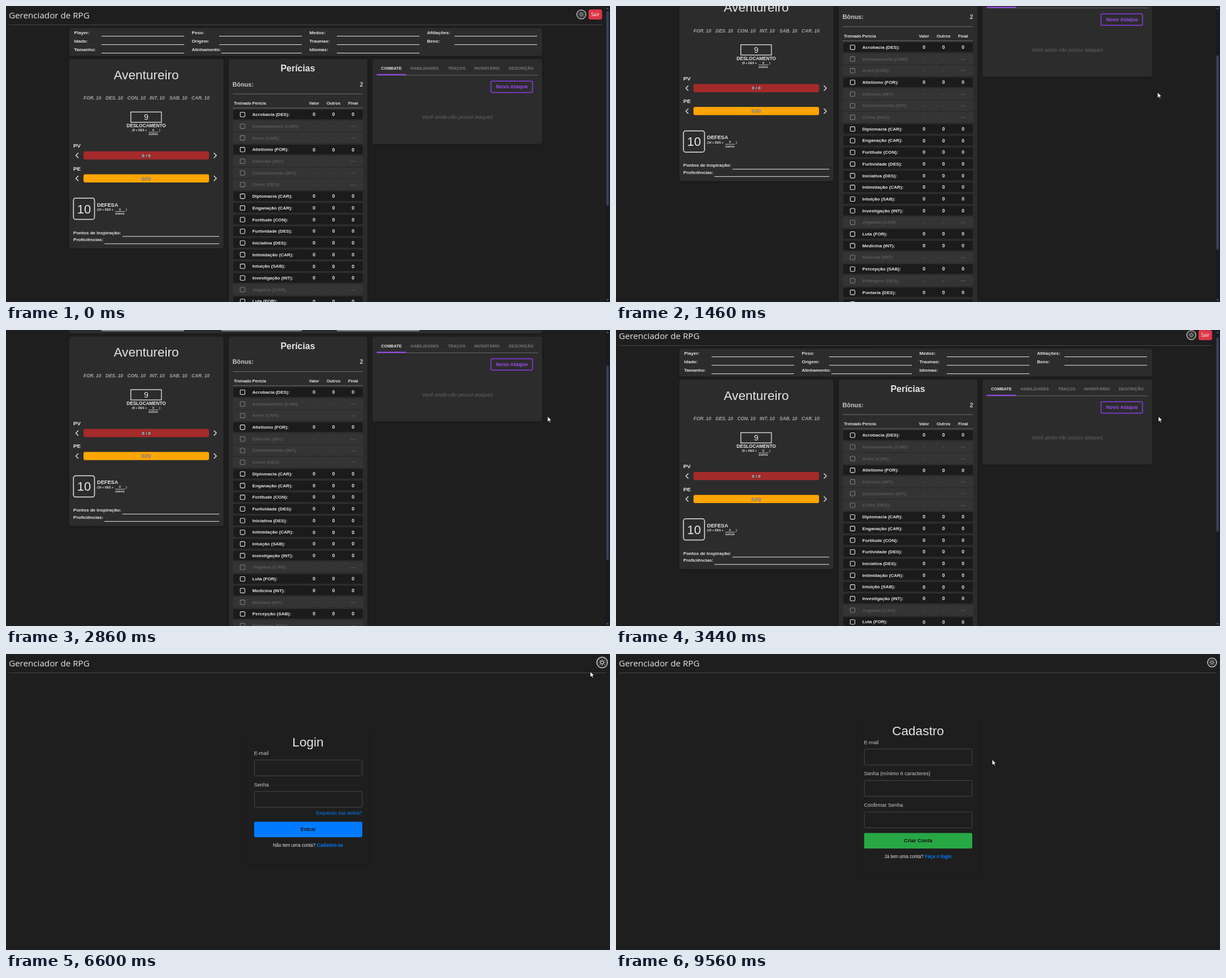
Write an HTML page that moves like this. It is 1068 px wide and 525 px high and loops after 9580 ms.

```html
<!DOCTYPE html>
<html lang="pt">
<head>
<meta charset="utf-8">
<title>Gerenciador de RPG</title>
<style>
/* --k: share of the light theme, --s: scroll offset */
@property --k { syntax: '<percentage>'; inherits: true; initial-value: 0%; }
@property --s { syntax: '<number>'; inherits: true; initial-value: 0; }

html, body { margin: 0; width: 100%; height: 100%; overflow: hidden; background: #1e1e1e; }
body { animation: theme 9.58s linear infinite, scroll 9.58s linear infinite; }

#stage {
  --bg: color-mix(in srgb, #fdfdfd var(--k), #1e1e1e);
  --panel: color-mix(in srgb, #f9f9f9 var(--k), #2c2c2c);
  --text: color-mix(in srgb, #2b2b2b var(--k), #e6e6e6);
  --soft: color-mix(in srgb, #4a4a4a var(--k), #c8c8c8);
  --attr: color-mix(in srgb, #666 var(--k), #a4a4a4);
  --tab: color-mix(in srgb, #858585 var(--k), #777);
  --dim: color-mix(in srgb, #999 var(--k), #636363);
  --off: color-mix(in srgb, #a8a8a8 var(--k), #5a5a5a);
  --box: color-mix(in srgb, #777 var(--k), #808080);
  --rule: color-mix(in srgb, #ccc var(--k), #474747);
  --row: color-mix(in srgb, #fff var(--k), #1b1b1b);
  --rowOff: color-mix(in srgb, #f0f0f0 var(--k), #343434);
  display: block; width: 1068px; height: 525px; background: var(--bg);
  font-family: "Liberation Sans", Arial, sans-serif;
}
text { fill: var(--text); white-space: pre; }
.b { font-weight: bold; }
.i { font-style: italic; }
.ui { font-family: "Open Sans", "Noto Sans", sans-serif; }
.soft { fill: var(--soft); }
.attr { fill: var(--attr); }
.tab { fill: var(--tab); }
.dim { fill: var(--dim); }
.off { fill: var(--off); }
.blue { fill: #007bff; }
.ink { fill: #141414; }
.purple { fill: #9a48f0; }
.white { fill: #fff; }
.onbar { fill: #e8e8e8; stroke: #222; stroke-width: 1; paint-order: stroke; }
.panel { fill: var(--panel); filter: drop-shadow(0 1px 1.5px rgba(0,0,0,.25)); }
.card { fill: var(--bg); filter: drop-shadow(0 1px 2px rgba(0,0,0,.16)); }
.ln { fill: none; stroke: var(--text); }
.rule { fill: none; stroke: var(--rule); }
.row { fill: var(--row); }
.rowOff { fill: var(--rowOff); }
.boxOff { fill: none; stroke: var(--box); }
.solid { fill: var(--text); }

#sheet, #login, #signup, #hand, #arrow, .sun, .moon, .exit, #enter, #link {
  animation: 9.58s step-end infinite;
}
#sheet { animation-name: sheet; }
#login { animation-name: login; }
#signup { animation-name: signup; }
#page { transform: translateY(calc(var(--s) * -1px)); }
#thumb { transform: translateY(calc(var(--s) * .657px)); }
.sun { animation-name: sun; }
.moon { animation-name: moon; }
.exit { animation-name: exit; }
#enter { animation-name: enter; }
#link { animation-name: link; }
#sheet .icon { animation: sheetIcon 9.58s linear infinite; }
#login .icon { animation: loginIcon 9.58s linear infinite; }
#cursor { animation: move 9.58s ease-in-out infinite; }
#arrow { animation-name: arrow; }
#hand { animation-name: hand; }

@keyframes theme {
  0%, 41.54% { --k: 0%; }
  44.15%, 65.24% { --k: 100%; }
  68.37%, 100% { --k: 0%; }
}
@keyframes scroll {
  0% { --s: 0; }
  9.81% { --s: 0; animation-timing-function: cubic-bezier(.4,.2,.8,.8); }
  15.24% { --s: 119; animation-timing-function: cubic-bezier(.2,.2,.6,1); }
  19.62%, 25.89% { --s: 248; }
  27.14% { --s: 207; animation-timing-function: cubic-bezier(.3,.35,.7,1); }
  32.15%, 34.66% { --s: 24; }
  35.91% { --s: 6; }
  36.74%, 100% { --s: 0; }
}
@keyframes sheet { 0% { opacity: 1; } 60.54%, 100% { opacity: 0; } }
@keyframes login { 0% { opacity: 0; } 60.54% { opacity: 1; } 97.29%, 100% { opacity: 0; } }
@keyframes signup { 0% { opacity: 0; } 97.29%, 100% { opacity: 1; } }
@keyframes sun { 0% { opacity: 1; } 41.54% { opacity: 0; } 65.24%, 100% { opacity: 1; } }
@keyframes moon { 0% { opacity: 0; } 41.54% { opacity: 1; } 65.24%, 100% { opacity: 0; } }
@keyframes exit { 0% { fill: #dc3545; } 56.37%, 100% { fill: #bb2d3b; } }
@keyframes enter { 0% { fill: #007bff; } 78.91% { fill: #0062cc; } 82.46%, 100% { fill: #007bff; } }
@keyframes link { 0% { text-decoration: none; } 86.64%, 100% { text-decoration: underline; } }
@keyframes sheetIcon {
  0%, 40.4% { transform: scale(1); }
  42%, 55% { transform: scale(1.18); }
  57%, 100% { transform: scale(1); }
}
@keyframes loginIcon {
  0%, 62.7% { transform: scale(1); }
  64.5%, 68.9% { transform: scale(1.18); }
  71%, 100% { transform: scale(1); }
}
@keyframes move {
  0%, 34.66% { transform: translate(957.5px, 153px); }
  35.91% { transform: translate(959px, 153px); }
  40.71%, 54.49% { transform: translate(1014px, 19px); }
  59.08%, 61.59% { transform: translate(1041px, 16px); }
  63.47%, 67.2% { transform: translate(1053px, 14px); }
  68.89% { transform: translate(1033px, 31px); }
  70.15%, 70.98% { transform: translate(1030px, 36px); }
  80.79%, 81.63% { transform: translate(545px, 310px); }
  84.55% { transform: translate(510px, 364px); }
  88.31%, 97.29% { transform: translate(574px, 338px); }
  99.6%, 100% { transform: translate(665px, 187px); }
}
@keyframes arrow {
  0% { opacity: 0; } .84% { opacity: 1; } 40.4% { opacity: 0; } 60.54% { opacity: 1; }
  62.9% { opacity: 0; } 68% { opacity: 1; } 78.91% { opacity: 0; } 82.46% { opacity: 1; }
  86.64% { opacity: 0; } 97.29%, 100% { opacity: 1; }
}
@keyframes hand {
  0% { opacity: 0; } 40.4% { opacity: 1; } 60.54% { opacity: 0; } 62.9% { opacity: 1; }
  68% { opacity: 0; } 78.91% { opacity: 1; } 82.46% { opacity: 0; } 86.64% { opacity: 1; }
  97.29%, 100% { opacity: 0; }
}
</style>
</head>
<body>
<svg id="stage" viewBox="0 0 1068 525"></svg>
<script>
const text = (x, y, size, str, cls = '', anchor = 'start') =>
  `<text x="${x}" y="${y}" font-size="${size}" class="${cls}" text-anchor="${anchor}">${str}</text>`;
const mid = (x, y, size, str, cls) => text(x, y, size, str, cls, 'middle');
const rect = (x, y, x2, y2, r, attrs) =>
  `<rect x="${x}" y="${y}" width="${x2 - x}" height="${y2 - y}" rx="${r}" ${attrs}/>`;
const hline = (x, x2, y, cls = 'ln', w = 1) =>
  `<path d="M${x} ${y}H${x2}" class="${cls}" stroke-width="${w}"/>`;
const panel = (x, y, x2, y2, cls = 'panel') => rect(x, y, x2, y2, 4, `class="${cls}"`);

function icon(x) {
  let rays = '';
  for (let a = 0; a < 360; a += 45) rays += `<path d="M0-3.6V-5.2" transform="rotate(${a})"/>`;
  return `<g transform="translate(${x} 15)"><g class="icon">
    <circle r="7.9" class="ln" stroke-width="1.3"/>
    <g class="sun"><g class="ln" stroke-width="1"><circle r="2.3"/>${rays}</g></g>
    <g class="moon"><path class="solid" d="M-1-5A5 5 0 1 0 5 1.6A4.3 4.3 0 0 1-1-5Z"/></g>
  </g></g>`;
}

const header = (right, iconX) =>
  text(5, 21.6, 15.2, 'Gerenciador de RPG', 'ui" font-weight="500') +
  hline(5, right, 33.5, 'rule') + icon(iconX);

function infoPanel() {
  const columns = [
    ['Player:', 'Idade:', 'Tamanho:'], ['Peso:', 'Origem:', 'Alinhamento:'],
    ['Medos:', 'Traumas:', 'Idiomas:'], ['Afiliações:', 'Bens:'],
  ];
  return panel(112, 39, 948, 88.5) + columns.map((labels, c) => labels.map((label, r) => {
    const x = 120.5 + c * 208, y = 50 + r * 15;
    return text(x, y, 8.1, label, 'b') +
      hline(x + (label === 'Alinhamento:' ? 52.5 : 48.5), x + 194.5, y + 3.5);
  }).join('')).join('');
}

// Small formula with an editable bonus
const formula = (x, y, str, bonusX) =>
  text(x, y, 5.3, str, 'b') + mid(bonusX, y - .3, 5.3, '0', 'b') +
  hline(bonusX - 8.5, bonusX + 9, y + 1.5, 'ln', .8) +
  mid(bonusX, y + 7, 5.3, 'outros', 'b') + text(bonusX + 10.5, y, 5.3, ')', 'b');

const bar = (y, label, color) =>
  text(119, y - 14, 9.9, label, 'b') +
  rect(137, y - 7.3, 359, y + 7.2, 3, `fill="${color}"`) +
  mid(248, y + 2.8, 8, '0 / 0', 'b onbar') +
  `<path class="ln" stroke-width="1.4" d="M128 ${y - 4.5}l-4.5 4.5l4.5 4.5M367.5 ${y - 4.5}l4.5 4.5l-4.5 4.5"/>`;

function heroPanel() {
  const attrs = { FOR: 137, DES: 176, CON: 214.5, INT: 254, SAB: 289, CAR: 328 };
  return panel(112, 94, 384.5, 430) +
    mid(248, 129.5, 22.6, 'Aventureiro') +
    Object.entries(attrs).map(([n, x]) => text(x, 166, 8.3, n + '. 10', 'b i attr')).join('') +
    rect(220.7, 188, 274.8, 206.3, 0, 'class="ln" stroke-width="1.3"') +
    mid(248, 202.2, 14, '9') +
    mid(248, 215.2, 8.2, 'DESLOCAMENTO', 'b') +
    formula(223, 222.4, '(9 + DES +', 260.5) +
    bar(265, 'PV', '#a52a2a') + bar(305.7, 'PE', '#ffa500') +
    rect(119.3, 340.7, 156.5, 378.5, 4, 'class="ln" stroke-width="1.5"') +
    mid(138, 367.5, 22, '10') +
    text(161, 355.5, 9.2, 'DEFESA', 'b') +
    formula(161, 363, '(10 + DES +', 201.5) +
    text(119, 404.5, 8.1, 'Pontos de Inspiração:', 'b') + hline(206, 377, 408.7) +
    text(119, 417, 8.1, 'Proficiências:', 'b') + hline(174, 377, 421.7);
}

// A leading "-" marks a skill that needs training
const skills = `Acrobacia DES,-Adestramento CAR,-Artes CAR,Atletismo FOR,-Ciências INT,
-Conhecimento INT,-Crime DES,Diplomacia CAR,Enganação CAR,Fortitude CON,Furtividade DES,
Iniciativa DES,Intimidação CAR,Intuição SAB,Investigação INT,-Jogatina CAR,Luta FOR,
Medicina INT,-Nobreza INT,Percepção SAB,-Pilotagem DES,Pontaria DES,Reflexos DES,
-Religião SAB,Sobrevivência SAB,-Tecnologia INT,-Tática INT,Vontade SAB`.split(/,\s*/);

function skillRow(entry, i) {
  const off = entry[0] === '-';
  const [name, attr] = entry.replace('-', '').split(' ');
  const y = 192.4 + i * 20.7, cls = off ? 'b off' : 'b';
  const values = off ? ['-', '-', '—'] : [0, 0, 0];
  return (off ? rect(401, y - 9.5, 632, y + 9.5, 2, 'class="rowOff"')
              : rect(402, y - 8.5, 631, y + 8.5, 1.5, 'class="row"')) +
    rect(414.2, y - 3.9, 422.4, y + 4.3, 1.6, `class="${off ? 'boxOff' : 'ln'}" stroke-width="1.1"`) +
    text(435.5, y + 2.8, 8.1, `${name} (${attr}):`, cls) +
    values.map((v, c) => mid(544.7 + c * 34.5, y + 3, 8.6, v, cls)).join('');
}

function skillPanel() {
  return panel(394, 94, 639, 766) +
    mid(516, 116, 15.9, 'Perícias', 'b') +
    text(400.5, 142.5, 10.8, 'Bônus:', 'b soft') + text(631.5, 142.5, 10.8, '2', 'b soft', 'end') +
    hline(401, 631, 156, 'boxOff', .8) +
    text(403, 175.2, 7.4, 'Treinado', 'b') + text(435.5, 175.2, 7.4, 'Perícia', 'b') +
    ['Valor', 'Outros', 'Final'].map((s, c) => mid(544.7 + c * 34.5, 175.2, 7.4, s, 'b')).join('') +
    hline(401, 631, 181, 'boxOff', .8) + skills.map(skillRow).join('');
}

function combatPanel() {
  const tabs = { COMBATE: 681.5, HABILIDADES: 740.5, 'TRAÇOS': 797, 'INVENTÁRIO': 850.5, 'DESCRIÇÃO': 911 };
  return panel(648, 94, 948, 244.5) +
    Object.entries(tabs).map(([s, x], i) => mid(x, 113.2, 7.3, s, i ? 'b tab' : 'b')).join('') +
    hline(655.5, 941, 122.7, 'boxOff', .7) +
    rect(655.5, 120.8, 707.5, 122.8, 0, 'fill="#9a48f0"') +
    rect(857.6, 133.2, 931, 153.5, 2, 'fill="none" stroke="#8b3ce6" stroke-width="1.5"') +
    mid(894.5, 146.4, 9.15, 'Novo Ataque', 'b purple') +
    mid(798, 200.2, 9.03, 'Você ainda não possui ataques', 'i dim');
}

const scrollbar = rect(1060, 0, 1068, 525, 0, 'fill="#191b23"') +
  rect(1061.6, 9, 1065.8, 354, 2, 'id="thumb" fill="#3b435a"') +
  '<path fill="#5a6277" d="M1061.5 5.5l2.2-3l2.2 3zM1061.5 520l2.2 3l2.2-3z"/>';

const field = (y, label) =>
  text(438.5, y, 9.1, label, 'soft') +
  rect(439.3, y + 9, 629.7, y + 37.2, 1.5, 'class="rule" stroke-width="1"');
const button = (y, label, attrs) =>
  rect(438.7, y, 630, y + 27.5, 2, attrs) + mid(534.3, y + 16.6, 9.2, label, 'b ink');
const prompt = (y, ask, link, attrs = '') =>
  mid(534, y, 8.15, `${ask} <tspan class="b blue" ${attrs}>${link}</tspan>`);

const login = header(1062, 1054) + panel(428, 134, 641, 373.5, 'card') +
  mid(534, 164, 22.6, 'Login') +
  field(179, 'E-mail') + field(234.8, 'Senha') +
  text(629.5, 285, 8.2, 'Esqueceu sua senha?', 'blue', 'end') +
  button(297.5, 'Entrar', 'id="enter" fill="#007bff"') +
  prompt(342.3, 'Não tem uma conta?', 'Cadastre-se', 'id="link"');

const signup = header(1062, 1054) + panel(428, 114, 641, 393.5, 'card') +
  mid(534, 144.3, 22.6, 'Cadastro') +
  field(159.6, 'E-mail') + field(215.4, 'Senha (mínimo 6 caracteres)') + field(271.1, 'Confirmar Senha') +
  button(317.5, 'Criar Conta', 'fill="#28a745"') +
  prompt(362.2, 'Já tem uma conta?', 'Faça o login');

const sheet = '<g id="page">' + header(1054, 1017.3) +
  rect(1030, 6, 1054, 24, 3.5, 'class="exit" fill="#dc3545"') + mid(1042, 18.2, 8.6, 'Sair', 'ui white') +
  infoPanel() + heroPanel() + skillPanel() + combatPanel() + '</g>' + scrollbar;

const cursor = `<g id="cursor" fill="#fff" stroke="#000" stroke-width=".8" stroke-linejoin="round">
  <path id="arrow" d="M0 0V10.2L2.4 8L4 11.6L5.6 10.9L4.1 7.4H7.2Z"/>
  <path id="hand" d="M-1 .8Q0-.6 1 .8V5L5 6Q6 6.4 5.8 7.6L5 11.8H-1L-3.8 8Q-4.2 6.6-2.8 6.6L-1 8Z"/>
</g>`;

document.getElementById('stage').innerHTML =
  `<g id="sheet">${sheet}</g><g id="login">${login}</g><g id="signup">${signup}</g>${cursor}`;
</script>
</body>
</html>
```
